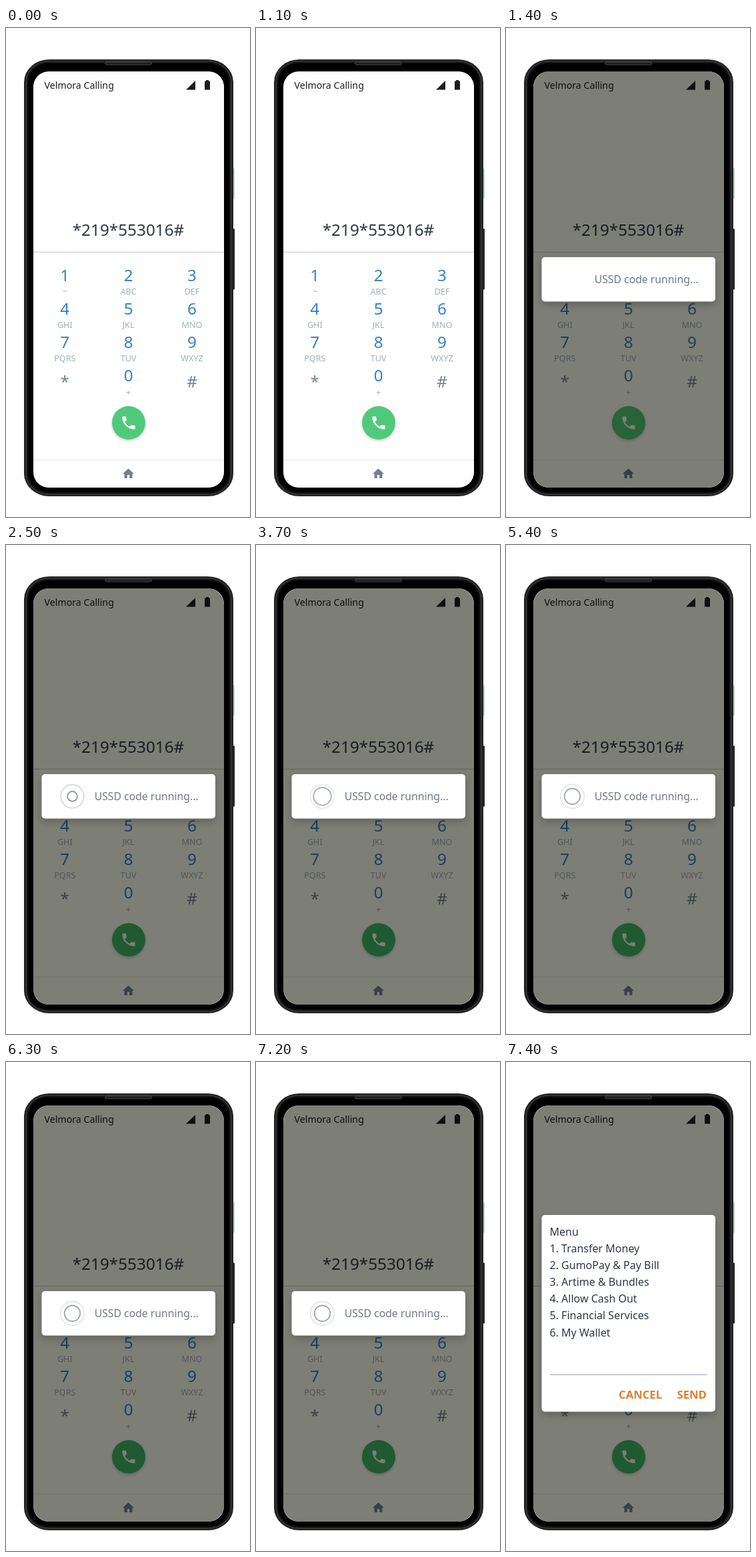
These frames come from a looping animation (366 by 732 pixels, 8000 ms). An HTML page:

```html
<!DOCTYPE html>
<html lang="en">
<head>
<meta charset="utf-8">
<title>USSD dialer</title>
<style>
  html, body { margin: 0; width: 100%; height: 100%; overflow: hidden; background: #fff; }
  svg { display: block; width: 366px; height: 732px; font-family: "Noto Sans", "Open Sans", sans-serif; }
  .mid { text-anchor: middle; }
  .digit { font-size: 24.3px; fill: #3182ce; }
  .letters { font-size: 12.6px; fill: #a0aec0; }
  .symbol { font-size: 24.3px; fill: #718096; }
  .action { font-size: 16.7px; font-weight: 700; fill: #dd8030; }
  .card { fill: #fff; filter: drop-shadow(0 5px 6px rgba(0, 0, 0, .22)); }
  #shade { fill: #7d7e76; mix-blend-mode: multiply; }
</style>
</head>
<body>
<svg viewBox="0 0 366 732">
  <!-- phone body -->
  <rect x="339" y="210" width="4" height="45.500" rx="1" fill="#b4d3c3"/>
  <rect x="339" y="300.500" width="4" height="91" rx="1" fill="#222423"/>
  <rect x="27" y="47" width="314" height="654" rx="38" ry="34" fill="#232423"/>
  <rect x="30.500" y="50" width="307" height="648" rx="34" ry="31" fill="#111211" stroke="#434543"/>
  <rect x="33.500" y="53" width="301" height="642" rx="30" ry="28" fill="#000"/>
  <rect x="148.500" y="51" width="70" height="4" rx="2" fill="#1c1d1c" stroke="#555" stroke-width=".8"/>
  <rect x="41" y="65" width="286" height="623" rx="23" fill="#fff"/>

  <!-- dialer -->
  <text x="57.500" y="90.500" font-size="14.200" fill="#1c1c1c">Velmora Calling</text>
  <path d="M270 92.500L284 79V92.500ZM298 79.500h2v-1.500h4v1.500h2v13h-8Z" fill="#1c1c20"/>
  <text class="mid" x="183.500" y="310.500" font-size="24.300" fill="#2d3748">*219*553016#</text>
  <path d="M41 335.500H327" stroke="#cbcbcb"/>
  <path d="M41 646.500H327" stroke="#e6e6e6"/>
  <g id="keys"></g>
  <circle id="call" cx="184" cy="591" r="25" style="filter: drop-shadow(0 2px 2px rgba(0,0,0,.2))"/>
  <path transform="translate(171.200 578.200) scale(1.070)" fill="#fff" d="M6.620 10.790c1.440 2.830 3.760 5.140 6.590 6.590l2.200-2.200c.27-.27.67-.36 1.020-.24 1.120.37 2.330.57 3.570.57.55 0 1 .45 1 1V20c0 .55-.45 1-1 1C10.610 21 3 13.390 3 4c0-.55.45-1 1-1h3.500c.55 0 1 .45 1 1 0 1.250.2 2.450.57 3.570.11.35.03.74-.25 1.020z"/>
  <path transform="translate(173.300 657) scale(.85)" fill="#718096" d="M10 20v-6h4v6h5v-8h3L12 3 2 12h3v8z"/>

  <rect id="shade" x="41" y="65" width="286" height="623" rx="24"/>

  <g id="running">
    <rect class="card" x="53.500" y="343" width="260.500" height="66.500" rx="5"/>
    <g id="spinner" fill="none" stroke="#66707f" stroke-width="2" transform="translate(99.500 376.300) scale(.909)">
      <circle/><circle/>
    </g>
    <text x="132.700" y="381.700" font-size="15.750" fill="#6d788c">USSD code running...</text>
  </g>

  <g id="menu">
    <rect class="card" x="53.500" y="229" width="260.500" height="294.500" rx="5"/>
    <g id="items" font-size="16" fill="#2d3748"></g>
    <path d="M66 468H301.500" stroke="#8d94a8" stroke-width="1.200"/>
    <text class="action" x="169" y="504">CANCEL</text>
    <text class="action" x="256.500" y="504">SEND</text>
  </g>
</svg>
<script>
const LOOP = 8000, DIM_AT = 1400, SPIN_AT = 1430, RELEASE_AT = 1500, MENU_AT = 7400;
const PULSE = 1800;
const $ = id => document.getElementById(id);

function addText(parent, x, y, content, className = "") {
  const node = document.createElementNS("http://www.w3.org/2000/svg", "text");
  node.setAttribute("x", x);
  node.setAttribute("y", y);
  node.setAttribute("class", className);
  node.textContent = content;
  parent.append(node);
}

const columns = [88.3, 183.6, 279];
["~", "ABC", "DEF", "GHI", "JKL", "MNO", "PQRS", "TUV", "WXYZ"].forEach((letters, i) => {
  const x = columns[i % 3], y = 378.5 + 50.2 * Math.floor(i / 3);
  addText($("keys"), x, y, i + 1, "mid digit");
  addText($("keys"), x, y + 20.5, letters, "mid letters");
});
addText($("keys"), columns[0], 538, "*", "mid symbol");
addText($("keys"), columns[1], 529.2, "0", "mid digit");
addText($("keys"), columns[1], 549.5, "+", "mid letters");
addText($("keys"), columns[2], 537.5, "#", "mid symbol");

["Menu", "1. Transfer Money", "2. GumoPay & Pay Bill", "3. Artime & Bundles",
 "4. Allow Cash Out", "5. Financial Services", "6. My Wallet"]
  .forEach((line, i) => addText($("items"), 65.5, 259.7 + 25.15 * i, line));

// Cubic easing through (0,0) and (1,1), solved by bisection.
function bezier(x1, y1, x2, y2) {
  const at = (a, b, s) => 3 * (1 - s) ** 2 * s * a + 3 * (1 - s) * s * s * b + s ** 3;
  return x => {
    let low = 0, high = 1;
    for (let i = 0; i < 24; i++) {
      const s = (low + high) / 2;
      if (at(x1, x2, s) < x) low = s; else high = s;
    }
    return at(y1, y2, low);
  };
}
const grow = bezier(.165, .84, .44, 1);
const opacity = p => .85 * (1 - p) ** 1.3;

const show = (id, visible) => $(id).setAttribute("display", visible ? "inline" : "none");
const rings = [...$("spinner").children];

function draw(t) {
  show("shade", t >= DIM_AT);
  show("running", t >= DIM_AT && t < MENU_AT);
  show("spinner", t >= SPIN_AT);
  show("menu", t >= MENU_AT);
  $("call").setAttribute("fill", t < RELEASE_AT ? "#50ca7a" : "#40b56c");
  if (t < SPIN_AT) return;
  rings.forEach((ring, i) => {
    const p = (t - SPIN_AT + i * PULSE / 2) % PULSE / PULSE;
    ring.setAttribute("r", 1 + 19 * grow(p));
    ring.setAttribute("stroke-opacity", opacity(p));
  });
}

const start = performance.now();
function frame() {
  draw((performance.now() - start) % LOOP);
  requestAnimationFrame(frame);
}
frame();
</script>
</body>
</html>
```
